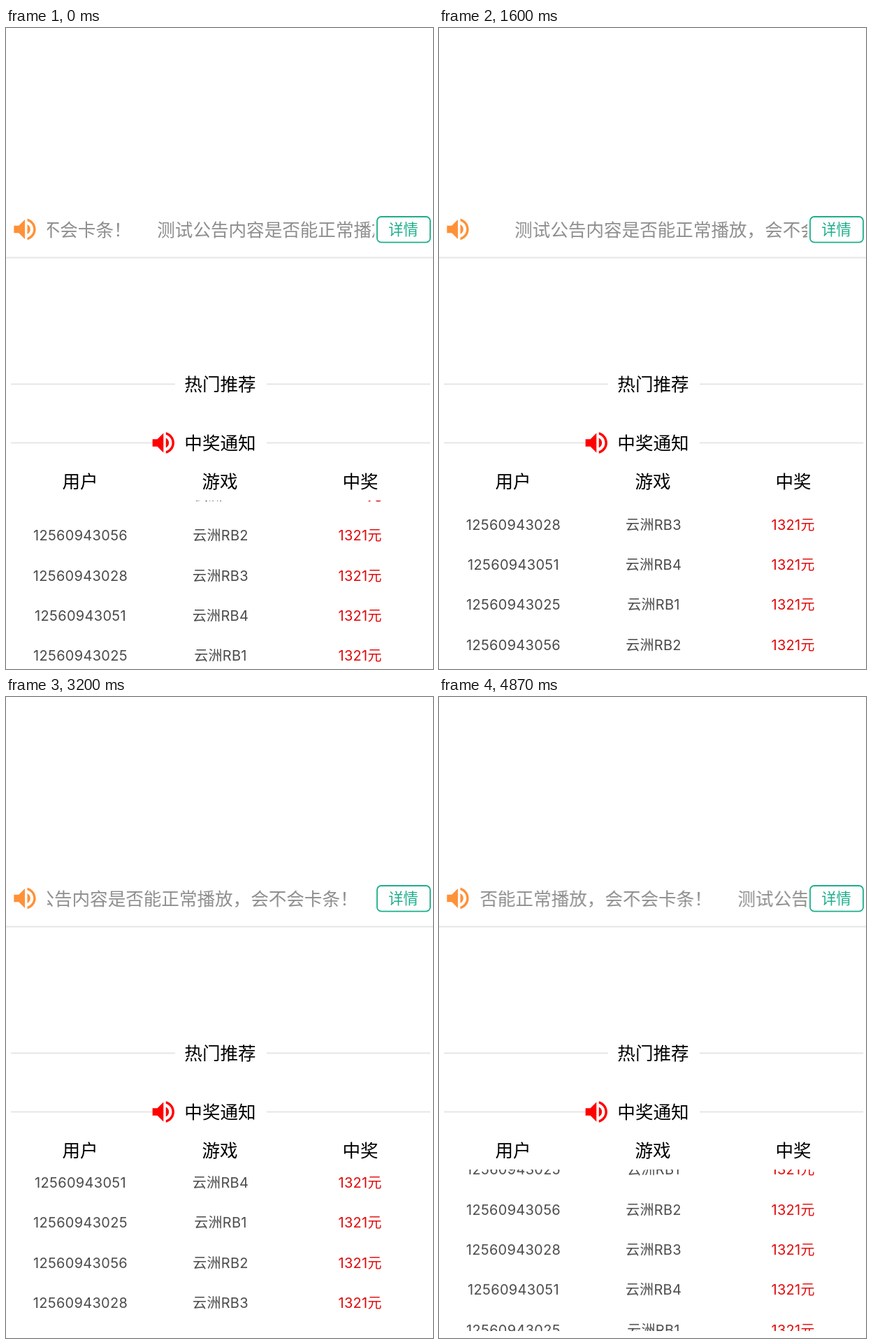
These frames come from a looping animation (611x917 px, 4.94 s). An HTML page:

```html
<!DOCTYPE html>
<html lang="zh-CN">
<head>
<meta charset="utf-8">
<title>中奖通知</title>
<style>
  html, body { margin: 0; width: 100%; height: 100%; overflow: hidden; background: #fff; }
  svg { display: block; }
  text { font-family: Inter, "Noto Sans CJK SC", "Noto Sans CJK", sans-serif; }

  .title { font-size: 25.57px; text-anchor: middle; fill: #000; }
  .notice { font-size: 25.57px; fill: #8e8e8e; }
  .detail { font-size: 21.3px; text-anchor: middle; fill: #1cae8b; }
  .row { font-size: 20px; letter-spacing: .3px; text-anchor: middle; fill: #4a4a4a; }
  .row .prize { fill: #e00808; }
  .rules { stroke: #e6e6e6; stroke-width: 2; }

  /* 74 held pictures per loop, about 15 per second */
  #marquee, #list { animation: 4940ms -10ms infinite; }
  #marquee { animation-name: marquee; }
  #list { animation-name: climb; animation-timing-function: steps(74); }

  @keyframes marquee {
    0% { transform: translateX(216.3px); animation-timing-function: steps(35); }
    47.297% { transform: translateX(58.7px); animation-timing-function: step-end; }
    47.2973% { transform: translateX(51px); animation-timing-function: steps(39); }
    100% { transform: translateX(-125px); }
  }
  @keyframes climb {
    from { transform: translateY(0); }
    to { transform: translateY(-225.2px); }
  }
</style>
</head>
<body>
<svg width="611" height="917" viewBox="0 0 611 917">
  <defs>
    <clipPath id="noticeBox"><rect x="59" y="265" width="468" height="50"/></clipPath>
    <clipPath id="listBox"><rect y="676.8" width="611" height="229.4"/></clipPath>
    <path id="speaker" transform="scale(1.74) translate(-12 -12)"
      d="M3 9v6h4l5 5V4L7 9H3zm13.5 3c0-1.77-1.02-3.29-2.5-4.03v8.05c1.48-.73 2.5-2.25 2.5-4.02zM14 3.23v2.06c2.89.86 5 3.54 5 6.71s-2.11 5.85-5 6.71v2.06c4.01-.91 7-4.49 7-8.77s-2.99-7.86-7-8.77z"/>
  </defs>

  <path class="rules" d="M0 328.5H611M7 509.5H242M373 509.5H607M7 593.5H210M373 593.5H607"/>

  <use href="#speaker" x="27" y="288" fill="#ff9138"/>
  <g clip-path="url(#noticeBox)"><g id="marquee"></g></g>
  <rect x="531" y="270" width="76" height="36.7" rx="6" fill="#fff" stroke="#1cae8b" stroke-width="1.8"/>
  <text class="detail" x="568.5" y="296">详情</text>

  <text class="title" x="306.5" y="519">热门推荐</text>
  <use href="#speaker" x="225.3" y="593.5" fill="#f00"/>
  <text class="title" x="306.5" y="603">中奖通知</text>

  <text class="title" x="106" y="657.5">用户</text>
  <text class="title" x="306" y="657.5">游戏</text>
  <text class="title" x="507" y="657.5">中奖</text>
  <g clip-path="url(#listBox)"><g id="list"></g></g>
</svg>
<script>
  const NOTICE = '测试公告内容是否能正常播放，会不会卡条！';
  const NOTICE_PERIOD = 548;
  const ROW_HEIGHT = 57.33;
  const FIRST_BASELINE = 676;
  const TAILS = ['25', '56', '28', '51'];

  function addText(parent, x, y, content, className) {
    const node = document.createElementNS(parent.namespaceURI, 'text');
    node.setAttribute('x', x);
    node.setAttribute('y', y);
    node.setAttribute('class', className);
    node.textContent = content;
    parent.append(node);
  }

  const marquee = document.getElementById('marquee');
  for (const copy of [-1, 0, 1]) {
    addText(marquee, copy * NOTICE_PERIOD, 298.2, NOTICE, 'notice');
  }

  const list = document.getElementById('list');
  list.setAttribute('class', 'row');
  for (let i = 0; i < 9; i++) {
    const y = FIRST_BASELINE + i * ROW_HEIGHT;
    const k = i % TAILS.length;
    addText(list, 106.5, y, '125609430' + TAILS[k], 'user');
    addText(list, 307, y, '云洲RB' + (k + 1), 'game');
    addText(list, 506.7, y, '1321元', 'prize');
  }
</script>
</body>
</html>
```
